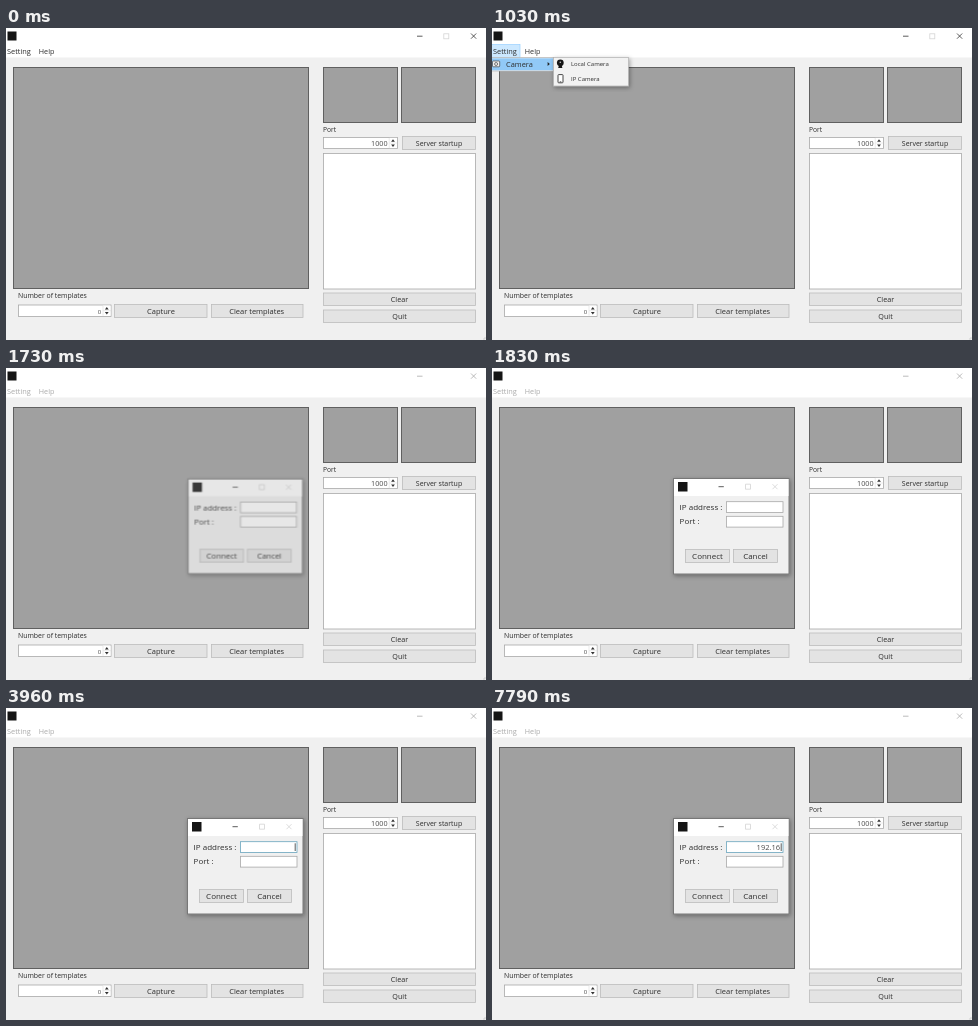
An HTML page that plays this animation: 480x312 px, repeating every 8 s.

```html
<!DOCTYPE html>
<html lang="en">
<head>
<meta charset="utf-8">
<title>Camera setup</title>
<style>
  html, body { margin: 0; width: 100%; height: 100%; overflow: hidden; background: #f0f0f0; }
  svg { display: block; width: 480px; height: 312px; }
  text { font-family: "Open Sans", "Noto Sans", sans-serif; font-size: 7.2px; fill: #2c2c2c; }
  .mid { text-anchor: middle; }
  .end { text-anchor: end; fill: #484848; }
  .small { font-size: 6px; }
  .dialog text { font-size: 8px; }
  .dialog .end { font-size: 7.55px; }
  .white { fill: #fff; }
  .view { fill: #a0a0a0; stroke: #606060; }
  .field { fill: #fff; stroke: #a8a8a8; stroke-width: .8; }
  .button { fill: #e3e3e3; stroke: #bcbcbc; stroke-width: .8; }
  .line { fill: none; stroke: #333; stroke-width: .8; }
  .pale { stroke: #d4d4d4; }
  .icon { fill: #151515; }

  /* One shared 8 s loop; every state holds until the next keyframe. */
  .anim { animation: 8s step-end infinite; }
  .titleHover { animation-name: titleHover; }
  .menu { animation-name: menu; }
  .submenu { animation-name: submenu; }
  .rowHover { animation-name: rowHover; }
  .active { animation-name: active; }
  .label { animation-name: label; }
  .control { animation-name: control; }
  .dialog { animation-name: dialog; transform-origin: 239px 158px; }
  .focus { animation-name: focus; }
  .caret { animation-name: caret; }

  @keyframes titleHover { 0%, 17.875%, 100% { opacity: 0 } 1.25% { opacity: 1 } }
  @keyframes menu { 0%, 17.875%, 100% { opacity: 0 } 5.375% { opacity: .5 } 6.625% { opacity: 1 } }
  @keyframes submenu { 0%, 17.875%, 100% { opacity: 0 } 11.625% { opacity: .5 } 12.875% { opacity: 1 } }
  @keyframes rowHover { 0%, 17.875%, 100% { opacity: 0 } 15.375% { opacity: 1 } }
  @keyframes active { 0% { opacity: 1 } 19.125%, 100% { opacity: 0 } }
  @keyframes label { 0% { fill: #2c2c2c } 19.125%, 100% { fill: #aaa } }
  @keyframes control { 0% { stroke: #333 } 19.125%, 100% { stroke: #aaa } }
  @keyframes dialog {
    0% { opacity: 0; transform: scale(.95) }
    20.375% { opacity: .14; transform: scale(.965) }
    21.625% { opacity: .75; transform: scale(.99) }
    22.875%, 100% { opacity: 1; transform: none }
  }
  @keyframes focus { 0% { stroke: #a8a8a8 } 43.25%, 100% { stroke: #69a5bd } }
  @keyframes caret {
    0%, 39.5%, 52.75%, 82.375% { opacity: 0 }
    32.875%, 46.125%, 59.5%, 86.125%, 100% { opacity: 1 }
  }
</style>
</head>
<body>
<svg viewBox="0 0 480 312">
  <defs>
    <filter id="shadow" x="-20%" y="-20%" width="140%" height="140%">
      <feDropShadow dx="1" dy="1.5" stdDeviation="2" flood-opacity=".35"/>
    </filter>
    <g id="spin">
      <rect class="white" x="-8" y=".4" width="7.6" height="10.2"/>
      <path d="M-8 .5V10.5M-8 5.5H0" stroke="#ddd" stroke-width=".6"/>
      <path d="M-6.1 4.2L-4.2 1.7L-2.3 4.2ZM-6.1 6.9L-4.2 9.4L-2.3 6.9Z" fill="#333"/>
    </g>
  </defs>

  <rect width="480" height="312" fill="#f0f0f0"/>
  <rect class="white" width="480" height="29.5"/>
  <rect class="icon" x="1.5" y="3.5" width="9" height="9"/>
  <path class="line anim control" d="M411 8.2H416.5M465 5.5L470.2 10.7M470.2 5.5L465 10.7"/>
  <rect class="line pale anim active" x="437.8" y="5.8" width="5" height="5"/>

  <rect class="anim titleHover" x="-.5" y="16.5" width="28.5" height="13" fill="#cce8ff" stroke="#99d1ff" stroke-width=".7"/>
  <text class="anim label" x="1" y="25.8" style="font-size:7.4px">Setting</text>
  <text class="anim label" x="32.8" y="25.8">Help</text>

  <rect class="view" x="7.5" y="39.5" width="295" height="221"/>
  <rect class="view" x="317.5" y="39.5" width="74" height="55"/>
  <rect class="view" x="395.5" y="39.5" width="74" height="55"/>

  <text x="317" y="103.6" style="font-size:6.7px">Port</text>
  <rect class="field" x="317.5" y="109.5" width="74" height="11"/>
  <text class="end" x="381.5" y="117.6">1000</text>
  <use href="#spin" x="391.2" y="109.5"/>
  <rect class="button" x="396.5" y="108.5" width="73" height="13"/>
  <text class="mid" x="433" y="117.5" style="font-size:7px">Server startup</text>
  <rect class="field" x="317.5" y="125.5" width="152" height="135.5"/>
  <rect class="button" x="317.5" y="265" width="152" height="12.5"/>
  <text class="mid" x="393.5" y="274">Clear</text>
  <rect class="button" x="317.5" y="282" width="152" height="12.5"/>
  <text class="mid" x="393.5" y="291">Quit</text>

  <text x="12" y="270.4" style="font-size:6.9px">Number of templates</text>
  <rect class="field" x="12.5" y="277" width="92.5" height="11.5"/>
  <text class="end small" x="95.3" y="285.6">0</text>
  <use href="#spin" x="105" y="277.2"/>
  <rect class="button" x="108.5" y="276.5" width="92.5" height="13"/>
  <text class="mid" x="155" y="285.8" style="font-size:7.5px">Capture</text>
  <rect class="button" x="205.5" y="276.5" width="91.5" height="13"/>
  <text class="mid" x="250.7" y="285.8" style="font-size:7.5px">Clear templates</text>
  <path d="M479 309v2M477 311h2" stroke="#c8c8c8" stroke-width=".8"/>

  <g class="anim menu">
    <rect x="-1" y="29.5" width="62.5" height="13.5" fill="#f2f2f2" stroke="#b4b4b4" stroke-width=".7"/>
    <rect y="30.3" width="61" height="12" fill="#91c9f7"/>
    <rect x=".5" y="33" width="7.2" height="5.8" rx=".8" fill="#eee" stroke="#444" stroke-width=".7"/>
    <circle cx="4.1" cy="36" r="1.5" fill="none" stroke="#444" stroke-width=".7"/>
    <text x="14" y="38.8" style="font-size:7.4px">Camera</text>
    <path d="M55.6 34L57.8 36L55.6 38Z" fill="#222"/>
  </g>

  <g class="anim submenu">
    <rect x="61.5" y="29.5" width="75" height="28.5" fill="#f2f2f2" stroke="#b0b0b0" stroke-width=".7" filter="url(#shadow)"/>
    <rect class="anim rowHover" x="62.5" y="43.8" width="73" height="13.6" fill="#91c9f7"/>
    <circle class="icon" cx="68.3" cy="34.8" r="3.4"/>
    <path class="icon" d="M67 37h2.6l.8 3h-4.2z"/>
    <circle cx="68.3" cy="34.3" r=".8" fill="#ccc"/>
    <rect x="66" y="46.6" width="5" height="8.2" rx=".7" fill="#fff" stroke="#333" stroke-width=".9"/>
    <path d="M67.7 53.7h1.6" stroke="#333" stroke-width=".7"/>
    <text class="small" x="79" y="38">Local Camera</text>
    <text class="small" x="79" y="53">IP Camera</text>
  </g>

  <g class="anim dialog">
    <rect x="181.5" y="110.5" width="115.5" height="95.5" fill="#f0f0f0" stroke="#777" filter="url(#shadow)"/>
    <rect class="white" x="182" y="111" width="114.5" height="17"/>
    <rect class="icon" x="186" y="114" width="9.5" height="9.5"/>
    <path class="line" d="M226.5 118.7H231.8"/>
    <path class="line pale" d="M253.5 116.2h5v5h-5zM280.5 116.2l5 5M285.5 116.2l-5 5"/>
    <text x="187.6" y="142.3">IP address :</text>
    <text x="187.6" y="156.4">Port :</text>
    <rect class="field anim focus" x="234.5" y="133.7" width="56.5" height="10.8"/>
    <rect class="field" x="234.5" y="148.3" width="56.5" height="10.8"/>
    <text class="end" id="address" x="288.2" y="141.9"></text>
    <path class="anim caret" d="M289.2 135.3V143" stroke="#333" stroke-width=".8"/>
    <rect class="button" x="193.5" y="181.5" width="44" height="13"/>
    <text class="mid" x="215.5" y="190.8">Connect</text>
    <rect class="button" x="241.5" y="181.5" width="44" height="13"/>
    <text class="mid" x="263.5" y="190.8">Cancel</text>
  </g>
</svg>
<script>
  const typed = "192.168";
  const keyTimes = [4760, 5260, 5660, 6890, 7090, 7290, 7790];
  const address = document.getElementById("address");
  const clock = document.querySelector(".caret").getAnimations()[0];

  function tick() {
    const time = (clock.currentTime || 0) % 8000;
    const count = keyTimes.filter(key => key <= time).length;
    address.textContent = typed.slice(0, count);
    requestAnimationFrame(tick);
  }
  tick();
</script>
</body>
</html>
```
